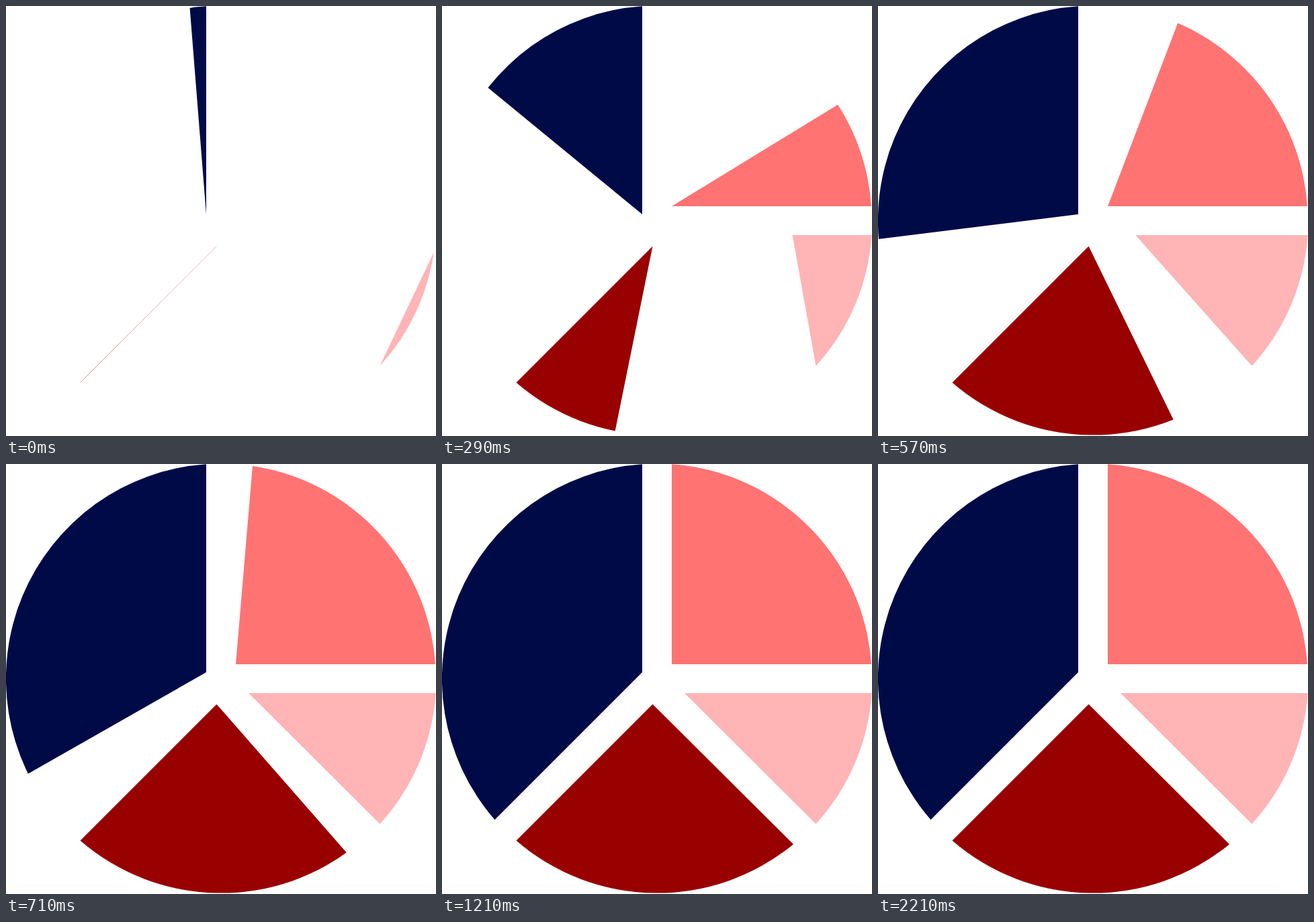
Animation, 640 px wide and 640 px high, one loop 2.87 s. Source, as an HTML page:

```html
<!DOCTYPE html>
<html lang="en">
<head>
<meta charset="utf-8">
<title>Pie chart reveal</title>
<style>
  html, body { margin: 0; width: 100%; height: 100%; overflow: hidden; background: #fff; }
  svg { display: block; width: 100%; height: 100%; }
</style>
</head>
<body>
<svg id="stage" viewBox="0 0 640 640"></svg>
<script>
const LOOP = 2870, FPS = 14, LAST_STEP = 31, RADIUS = 320;
const ACCEL = 0.09, DECEL = 0.27;

// pivot: centre of the wipe; angle: where it starts; sweep: degrees turned
// counter-clockwise; start and length are counted in steps.
const slices = [
  { color: '#000a47', apex: [298, 310], from: [78.5, 529.5], to: [298, 0.2],
    pivot: [298, 310], angle: -90, sweep: 135, start: -1, length: 14.18 },
  { color: '#ff7373', apex: [342, 298], from: [342, 0.2], to: [639, 298],
    pivot: [342, 298], angle: 0, sweep: 90, start: 0.13, length: 11.67 },
  { color: '#ffb4b6', apex: [361, 341], from: [639.6, 341], to: [556.5, 535.7],
    pivot: [556.5, 535.7], angle: -45, sweep: 90, start: -2.76, length: 12.34 },
  { color: '#990000', apex: [313.5, 357.5], from: [523, 566], to: [110.5, 560.5],
    pivot: [313.5, 357.5], angle: 135, sweep: 90, start: -0.1, length: 11.7 },
];

const stage = document.getElementById('stage');

function add(parent, name, attrs = {}) {
  const node = document.createElementNS('http://www.w3.org/2000/svg', name);
  for (const key in attrs) node.setAttribute(key, attrs[key]);
  return parent.appendChild(node);
}

slices.forEach((slice, i) => {
  const id = 'wipe' + i;
  slice.wipe = add(add(stage, 'clipPath', { id }), 'polygon');
  slice.clip = `url(#${id})`;
  slice.shape = add(stage, 'path', {
    fill: slice.color,
    d: `M${slice.apex}L${slice.from}A${RADIUS} ${RADIUS} 0 0 1 ${slice.to}Z`,
  });
});

// Short ramp up, constant speed, longer ramp down.
function ease(x) {
  if (x <= 0) return 0;
  if (x >= 1) return 1;
  const speed = 1 / (1 - (ACCEL + DECEL) / 2);
  if (x < ACCEL) return speed * x * x / (2 * ACCEL);
  if (x > 1 - DECEL) return 1 - speed * (1 - x) ** 2 / (2 * DECEL);
  return speed * (x - ACCEL / 2);
}

function ray([x, y], degrees) {
  const a = degrees * Math.PI / 180;
  return [x + 2000 * Math.cos(a), y + 2000 * Math.sin(a)];
}

function render(time) {
  const tick = Math.floor(time / 10) * 10 + 5;
  const step = Math.min(LAST_STEP, Math.floor(tick * FPS / 1000));
  for (const s of slices) {
    const p = ease((step - s.start) / s.length);
    s.shape.style.display = p > 0 ? '' : 'none';
    if (p === 1) {
      s.shape.removeAttribute('clip-path');
      continue;
    }
    const turned = p * s.sweep;
    // The wipe begins a little early so that only its moving edge shows.
    const corners = [20, -turned / 2, -turned].map(d => ray(s.pivot, s.angle + d));
    s.wipe.setAttribute('points', [s.pivot, ...corners].join(' '));
    s.shape.setAttribute('clip-path', s.clip);
  }
}

const began = performance.now();
function frame() {
  render((performance.now() - began) % LOOP);
  requestAnimationFrame(frame);
}
frame();
</script>
</body>
</html>
```
